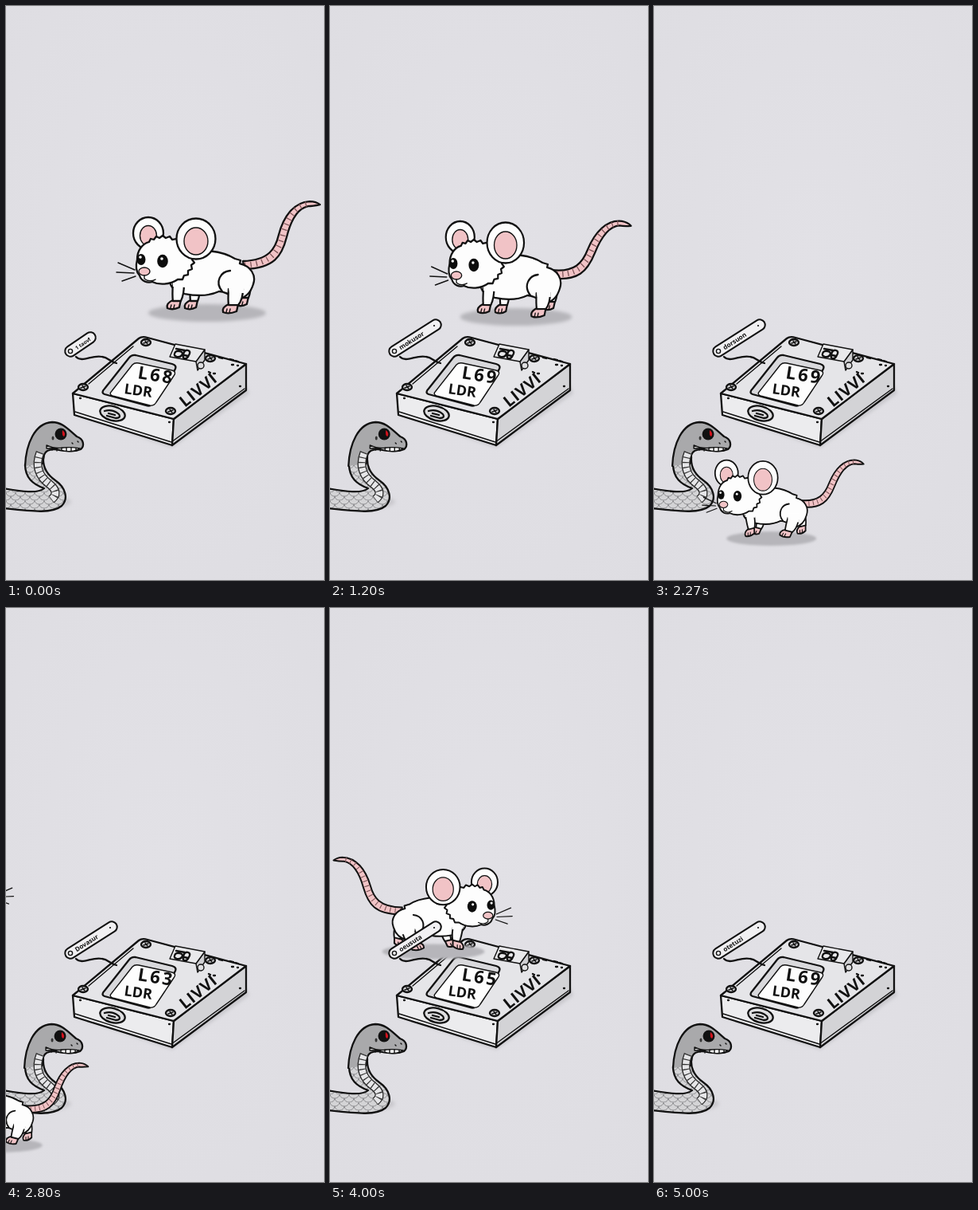
An HTML page for the animation above (5070 ms loop, 400 px wide and 720 px high).

```html
<!DOCTYPE html>
<html lang="en">
<head>
<meta charset="utf-8">
<title>Mouse, snake and sensor</title>
<style>
html, body { margin: 0; width: 100%; height: 100%; overflow: hidden; background: #e0dfe4; }
svg { display: block; width: 100vw; height: 100vh; }
.ink { stroke: #111; stroke-width: 2.3; stroke-linejoin: round; stroke-linecap: round; }
.w { fill: #fdfdfd; }
.p { fill: #f1c3c6; }
.n { fill: none; }
.thin { stroke-width: 1.4; }
text { font-family: "Open Sans", "Liberation Sans", sans-serif; font-weight: 700; fill: #111; }
</style>
</head>
<body>
<svg viewBox="0 0 400 720">
  <defs>
    <radialGradient id="paper" cx=".5" cy=".45" r=".75">
      <stop offset="0" stop-color="#e2e1e6"/><stop offset="1" stop-color="#dedde2"/>
    </radialGradient>
    <filter id="blur" x="-50%" y="-50%" width="200%" height="200%"><feGaussianBlur stdDeviation="2"/></filter>
    <filter id="glowBlur" x="-50%" y="-50%" width="200%" height="200%"><feGaussianBlur stdDeviation="4"/></filter>
    <pattern id="scales" width="12" height="10" patternUnits="userSpaceOnUse">
      <rect width="12" height="10" fill="#d4d4d6"/>
      <path d="M0,0 Q1,5 6,5 Q11,5 12,0 M-6,5 Q-5,10 0,10 Q5,10 6,5 Q7,10 12,10" fill="none" stroke="#858588" stroke-width=".9"/>
    </pattern>
  </defs>
  <rect width="400" height="720" fill="url(#paper)"/>

  <g id="device">
    <path d="M90,514 L209,554 306,486 302,476Z" fill="#c8c7cc" filter="url(#blur)"/>
    <path class="ink" fill="#ececee" d="M84,486 L211,518 209,551 86,513Z"/>
    <path class="ink" fill="#d3d3d6" d="M211,518 L302,449 302,482 209,551Z"/>
    <path class="ink" fill="#e5e5e8" d="M84,486 L167,417 Q171,414 178,416 L302,449 211,518Z"/>
    <path class="ink n thin" d="M87,509 L208,547 300,480 M104,474 L160,427"/>
    <path class="ink" fill="#d9d9dc" d="M163,438 L209,449 Q216,451 212,457 L185,498 Q182,503 176,501 L124,487 Q119,485 124,480 L155,441 Q158,437 163,438Z"/>
    <path class="ink thin w" d="M167,448 L209,457 Q215,459 211,464 L189,497 Q186,502 181,501 L134,489 Q129,487 133,483 L159,450 Q162,447 167,448Z"/>
    <path class="ink thin" fill="#cfcfd2" d="M239,446 L250,431 250,444 241,457Z"/>
    <path class="ink thin" fill="#e9e9eb" d="M213,424 L250,431 239,446 206,440Z"/>
    <path class="ink n" d="M214,430 l11,2 M212,436 q1,-4 6,-3 l3,1 q2,2 0,4 q-2,3 -6,2 q-4,-1 -3,-4Z M224,434 q2,-3 5,-2 q3,1 2,4 l-2,4 q-2,3 -5,2 q-2,-1 -1,-4Z M224,438 l5,1"/>
    <circle class="ink thin" cx="245" cy="451" r="4" fill="#dedee0"/>
    <g id="screws"></g>
    <ellipse class="ink" cx="134" cy="511" rx="16" ry="9" fill="#dedee0" transform="rotate(14 134 511)"/>
    <path class="ink n" d="M124,508 q10,-3 18,4 q3,5 -4,5 l-11,-3 M129,511 l8,2"/>
    <path class="ink n" d="M268,441 l4,1 M282,443 l4,1 m3,1 l3,1 m-8,4 l2,0 m5,1 l1,0 M255,459 l2,1 m4,1 l2,0 M93,492 l1,0 M205,522 l1,0 M294,477 l1,0"/>
    <text transform="translate(165 467) rotate(9)" font-size="22" letter-spacing="3">L6<tspan id="digit">8</tspan></text>
    <text transform="translate(148 486) rotate(8)" font-size="18">LDR</text>
    <text transform="translate(225 504) rotate(-39)" font-size="20" letter-spacing=".8">LIVVI</text>
  </g>

  <g id="snake">
    <ellipse cx="40" cy="622" rx="42" ry="10" fill="#cac9ce" filter="url(#blur)"/>
    <path class="ink" fill="url(#scales)" d="M-4,605 C20,609 40,612 48,605 C34,600 24,592 24,575 L47,566 C46,578 52,588 62,595 C75,604 79,618 70,627 C58,637 34,634 -4,630Z"/>
    <g id="snakeHead">
      <path class="ink" fill="#a9a9ab" d="M24,577 C25,550 36,523 58,522 C72,522 80,533 89,540 C98,543 99,552 94,556 C86,560 76,558 68,557 C57,555 50,557 48,563 L46,574"/>
      <path d="M51,551 Q62,556 72,554 Q82,553 93,555 Q82,561 68,557 Q58,554 51,555Z" class="ink thin w"/>
      <path class="ink n thin" d="M58,554 v3 M64,555 v3 M70,554 v3 M76,554 v4 M82,554 v4 M88,555 v3"/>
      <circle cx="69" cy="537" r="7.5" fill="#111"/>
      <path d="M71,532 q5,4 2,8 q-3,-1 -2,-8Z" fill="#d3121c"/>
      <ellipse cx="59" cy="542" rx="1.5" ry="2.5" fill="#333"/>
      <path class="ink n thin" d="M83,548 l1,1 M90,546 l1,1"/>
    </g>
    <g fill="none">
      <path d="M43,560 C36,577 42,591 55,600 C64,607 64,614 57,619" stroke="#222" stroke-width="11"/>
      <path d="M43,560 C36,577 42,591 55,600 C64,607 64,614 57,619" stroke="#e6e6e8" stroke-width="8.5"/>
      <path d="M43,560 C36,577 42,591 55,600 C64,607 64,614 57,619" stroke="#333" stroke-width="8.5" stroke-dasharray="1.2 5"/>
    </g>
  </g>

  <g id="mice"></g>

  <g id="tag">
    <path class="ink n" d="M88,440 C96,448 108,437 121,440 C129,441 130,446 139,448"/>
    <line id="glow" stroke="#ff2a2a" stroke-width="22" stroke-linecap="round" filter="url(#glowBlur)"/>
    <line id="rim" stroke-width="15.5" stroke-linecap="round"/>
    <line id="plate" stroke="#f1f0f2" stroke-width="11.5" stroke-linecap="round"/>
    <circle id="hole" class="n" cx="81" cy="433" r="2.6" stroke-width="1.4"/>
    <circle id="dot" r="1.1"/>
    <text id="label"></text>
  </g>
</svg>
<script>
const LOOP = 5070;
const $ = id => document.getElementById(id);
const set = (el, attrs) => { for (const k in attrs) el.setAttribute(k, attrs[k]); };
const clamp = v => Math.max(0, Math.min(1, v));
const ramp = (t, a, b) => clamp((t - a) / (b - a));

// Linear interpolation through [time, ...values] keys
function track(keys, t) {
  let i = 0;
  while (i < keys.length - 2 && t > keys[i + 1][0]) i++;
  const [a, b] = [keys[i], keys[i + 1]], u = ramp(t, a[0], b[0]);
  return a.slice(1).map((v, j) => v + (b[j + 1] - v) * u);
}
const stepAt = (steps, t) => steps.filter(s => s[0] <= t).pop()[1];

$('screws').innerHTML = [[176, 422], [257, 442], [207, 508], [97, 478]].map(([x, y]) =>
  `<ellipse class="ink" cx="${x}" cy="${y}" rx="6" ry="4" fill="#d5d5d8"/>
   <path class="ink n thin" d="M${x - 3},${y + 1} l6,-2 M${x - 1},${y - 2} l3,4"/>`).join('');

const shadow = (x, y, rx, ry) =>
  `<ellipse cx="${x}" cy="${y}" rx="${rx}" ry="${ry}" fill="#b6b5ba" filter="url(#blur)"/>`;
const ear = (x, y, r, inner) =>
  `<ellipse class="ink w" cx="${x}" cy="${y}" rx="${r}" ry="${r + 1}"/>
   <ellipse class="ink p thin" cx="${x}" cy="${y + 3}" rx="${inner}" ry="${inner + 2}"/>`;
const eye = (x, y, r) =>
  `<ellipse cx="${x}" cy="${y}" rx="${r}" ry="${r + 1.5}" fill="#0c0c0c"/>
   <circle cx="${x - 1}" cy="${y - 3}" r="1.8" fill="#fff"/>`;
const leg = (x, y, h, w) =>
  `<g transform="translate(${x} ${y})"><g class="leg">
   <path class="ink p" d="M${-w},${h - 8} Q${-w - 9},${h - 4} ${-w - 7},${h + 2} Q${-w},${h + 5} 1,${h + 1} L3,${h - 8}Z"/>
   <path class="ink thin n" d="M${-w - 3},${h + 2} l1,-4 M${-w + 1},${h + 2} l1,-4"/>
   <path class="ink w" d="M${-w},0 Q${-w - 1},${h / 2} ${-w},${h - 7} L3,${h - 7} Q${w},${h / 2} ${w},0"/></g></g>`;

const tailLine = 'M300,325 C335,323 343,306 348,288 C354,266 363,250 382,248';
const sideMouse = `${shadow(253, 385, 74, 11)}
  <g class="tail">
    <path class="ink p" d="M298,320 C331,319 339,304 343,287 C349,264 362,246 382,245 Q390,245 395,249 Q386,251 380,251 C366,254 358,270 353,290 C347,314 337,329 300,330Z"/>
    <path class="n" stroke="#7d5558" stroke-width="7" stroke-dasharray="1.3 6" d="${tailLine}"/>
  </g>
  ${leg(302, 346, 27, 6)}${leg(238, 350, 27, 6)}
  <path class="ink w" d="M222,310 C245,304 272,307 288,317 l7,2 -1,4 C308,326 315,338 311,349 C308,359 302,366 291,368 C282,362 275,358 268,358 C255,364 240,364 225,361 C212,358 206,352 206,344Z"/>
  ${leg(289, 355, 27, 9)}${leg(217, 348, 29, 7)}
  <path class="w" d="M209,340 L226,344 226,353 210,352Z M279,347 h20 v13 h-18Z"/>
  <path class="ink n" d="M272,358 C262,346 270,333 282,332"/>
  ${ear(179, 285, 19, 10.5)}
  <path class="ink w" d="M168,338 C163,333 163,326 165,318 C165,306 172,298 180,296 l2,-4 4,1 3,-4 4,2 4,-3 4,3 5,-2 3,4 5,-1 C222,296 232,303 236,314 l-2,4 3,4 -4,3 1,5 -5,2 0,5 -5,1 -2,5 -6,0 C206,350 192,350 184,346 C178,348 170,345 168,338Z"/>
  ${ear(239, 292, 24.5, 15)}
  ${eye(170, 318, 5.5)}${eye(197, 320, 6.8)}
  <ellipse class="ink p thin" cx="174" cy="333" rx="7" ry="5"/>
  <path class="ink n thin" d="M174,338 v4 q6,5 14,1 M162,331 L141,322 M161,335 L139,334 M163,339 L146,345"/>`;

const frontTail = 'M352,300 C376,290 366,258 390,244 L404,239';
const frontMouse = `${shadow(308, 372, 60, 11)}
  <path class="ink n" style="stroke-width:8" d="${frontTail}"/>
  <path class="n" stroke="#e0b9bc" stroke-width="4" d="${frontTail}"/>
  <path class="n" stroke="#444" stroke-width="4.5" stroke-dasharray="1.4 6" d="${frontTail}"/>
  <path class="ink p" d="M267,351 q-6,14 0,18 q10,4 17,1 l-6,-18Z M337,353 q-11,12 -9,18 q12,5 23,0 l-4,-18Z"/>
  <path class="ink w" d="M276,306 C266,312 263,322 259,336 Q262,346 269,352 L267,359 278,360 282,344 C296,354 318,355 328,350 L336,354 335,362 349,362 347,352 C354,344 361,337 359,324 C356,316 354,313 348,310Z"/>
  <path class="ink n" d="M282,344 q-8,-10 -11,-22 M328,350 q3,-14 17,-20"/>
  ${ear(284, 272, 22.5, 15)}${ear(351, 272, 19, 13)}
  <path class="ink w" d="M286,290 C288,276 298,268 309,267 l4,-3 4,3 5,-2 4,4 C342,271 348,284 347,298 l5,5 -7,3 -2,6 -8,1 -4,6 -8,-1 -6,5 -6,-5 -8,2 -3,-6 -8,-1 0,-6 -5,-4 4,-5Z"/>
  <path d="M304,290 l8,1 5,5 -2,9 -7,1 -5,-6Z M331,295 l7,-5 4,2 0,8 -6,4 -4,-3Z" fill="#0c0c0c"/>
  <ellipse class="ink p thin" cx="329" cy="310" rx="5" ry="3.5"/>
  <path class="ink n thin" d="M303,312 q14,-3 21,2 q7,4 14,0 M345,308 L368,304 M345,311 L367,313 M343,314 L360,322"/>`;

// keys: time, x, y, facing (1 left, -1 right; smaller when turning), tail angle
const actors = [
  { art: sideMouse, ox: 253, oy: 385, size: 1, from: 0, to: 1450,
    keys: [[0, 253, 385, 1, 0], [1200, 234, 390, .95, 8], [1320, 242, 388, .95, 4], [1450, 272, 384, .65, -2]] },
  { art: frontMouse, ox: 308, oy: 372, size: 1, from: 1450, to: 2230,
    keys: [[1450, 272, 382, .7, 0], [1600, 296, 374, 1, 0], [1800, 308, 372, 1, 0], [2230, 465, 374, 1, 0]] },
  { art: sideMouse, ox: 253, oy: 385, size: .82, from: 1200, to: 3200,
    keys: [[1200, 490, 648, .93, 8], [1800, 285, 652, .93, 8], [2270, 148, 668, .93, 8], [3150, -115, 678, .93, 7]] },
  { art: sideMouse, ox: 253, oy: 385, size: .87, from: 2650, to: 4960,
    keys: [[2750, -99, 405, -1, 4], [3400, 20, 417, -1, 2], [4000, 130, 431, -1, 2], [4180, 140, 429, -1, -4],
      [4360, 138, 425, 1, -2], [4960, -130, 418, 1, 2]] }
];
for (const a of actors) {
  a.el = document.createElementNS('http://www.w3.org/2000/svg', 'g');
  a.el.innerHTML = a.art;
  a.legs = a.el.querySelectorAll('.leg');
  a.tail = a.el.querySelector('.tail');
  $('mice').append(a.el);
}

const digits = [[0, '8'], [330, '9'], [2730, '3'], [3070, '8'], [3730, '5'], [4400, '9']];
const labels = ['1 taovi', 'tamuvi', 'mokusor', 'dorsuon', 'Dovasur', 'ontesur', 'oeusuta', 'ovnuzut', 'otetuzi'];

function drawMouse(a, t) {
  const on = t >= a.from && t < a.to;
  a.el.style.display = on ? '' : 'none';
  if (!on) return;
  const [x, y, face, tail] = track(a.keys, t);
  set(a.el, { transform: `translate(${x} ${y}) scale(${a.size * face} ${a.size}) translate(${-a.ox} ${-a.oy})` });
  a.legs.forEach((l, i) => set(l, { transform: `rotate(${(i % 3 ? -14 : 14) * Math.sin(t / 95)})` }));
  if (a.tail) set(a.tail, { transform: `rotate(${tail + Math.sin(t / 160)} 260 325)` });
}

function drawTag(t) {
  const grow = ramp(t, 0, 700), x = 106 + 27 * grow, y = 416 - 16 * grow;
  const red = ramp(t, 3000, 3250) * (1 - ramp(t, 3600, 3850));
  const ink = `rgb(${17 + 215 * red},${17 + 30 * red},${17 + 30 * red})`;
  for (const id of ['glow', 'rim', 'plate']) set($(id), { x1: 81, y1: 433, x2: x, y2: y });
  set($('glow'), { opacity: red * .45 });
  set($('rim'), { stroke: ink });
  set($('hole'), { stroke: ink });
  set($('plate'), { stroke: red > .5 ? '#f6d3d5' : '#f1f0f2' });
  set($('dot'), { cx: x - 2, cy: y + 1, fill: ink });
  const angle = Math.atan2(y - 433, x - 81) * 180 / Math.PI;
  set($('label'), { transform: `translate(89 431.5) rotate(${angle})`, 'font-size': 6.5 + 1.5 * grow });
  $('label').style.fill = ink;
  $('label').textContent = labels[Math.floor(t / 600) % labels.length];
}

function draw() {
  const t = performance.now() % LOOP;
  actors.forEach(a => drawMouse(a, t));
  drawTag(t);
  $('digit').textContent = stepAt(digits, t);
  set($('snakeHead'), { transform: `translate(${-.6 * (1 - Math.cos(t / LOOP * 6 * Math.PI))} 0)` });
  requestAnimationFrame(draw);
}
draw();
</script>
</body>
</html>
```
